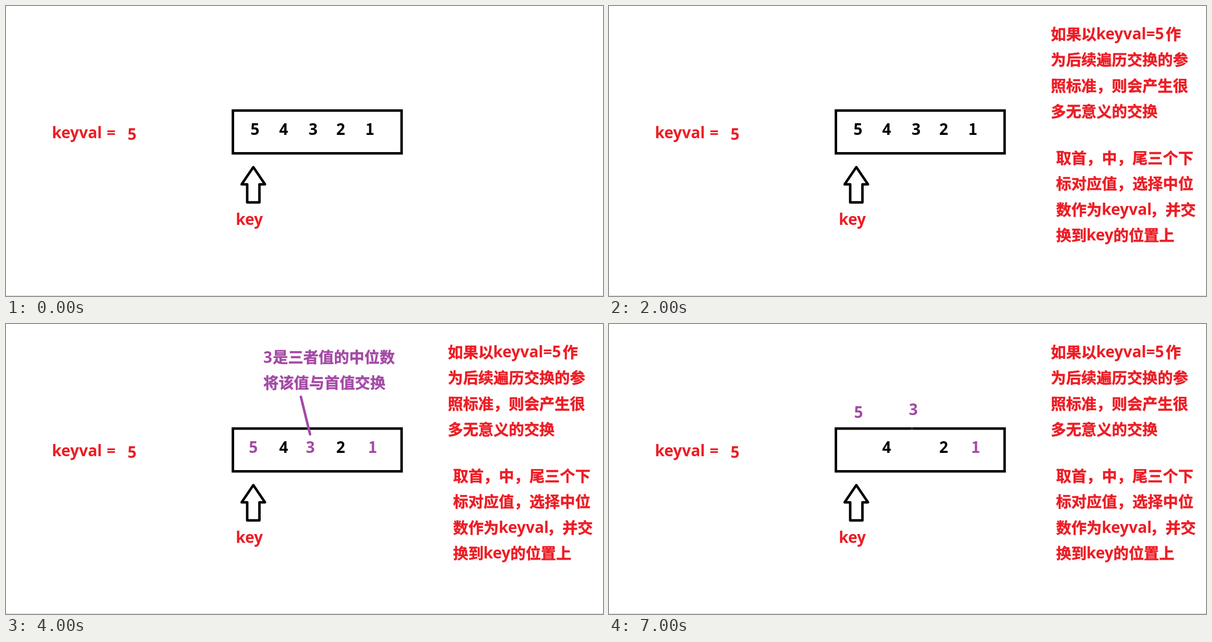
These frames come from a looping animation (1073 px wide and 522 px high, 8000 ms). An HTML page:

```html
<!DOCTYPE html>
<html lang="zh-CN">
<head>
<meta charset="utf-8">
<style>
html, body { margin: 0; width: 100%; height: 100%; overflow: hidden; background: #fff; }
svg { display: block; width: 100%; height: 100%; }
text { font: 700 28px "Open Sans", "Noto Sans", sans-serif; white-space: pre; }
.han { font: 700 27.45px "Noto Sans CJK SC", "Noto Sans CJK", sans-serif; stroke-width: 0.5px; }
.one { font: 700 28px "Noto Sans CJK SC", "Noto Sans CJK", sans-serif; }
</style>
</head>
<body>
<svg id="stage" viewBox="0 0 1073 522"></svg>
<script>
const NS = "http://www.w3.org/2000/svg";
const stage = document.getElementById("stage");
const RED = "#ed1c24", PURPLE = "#a349a4", BLACK = "#000";
const LOOP = 8000;
const timed = [];

function add(tag, attrs, from = 0, to = LOOP) {
  const el = document.createElementNS(NS, tag);
  for (const k in attrs) el.setAttribute(k, attrs[k]);
  stage.appendChild(el);
  timed.push({ el, from, to });
  return el;
}

function label(str, x, y, fill, from, to, extra = {}) {
  add("text", { x, y, fill, ...extra }, from, to).textContent = str;
}

const han = (str, x, y, fill, from, to) =>
  label(str, x, y, fill, from, to, { class: "han", stroke: fill });

function digit(n, x, y, fill, from, to) {
  const extra = { "text-anchor": "middle" };
  if (n === 1) extra.class = "one";
  label(String(n), x, y, fill, from, to, extra);
}

// Array box, pointer and bottom rule
const outline = { fill: "none", stroke: BLACK, "stroke-width": 4.5 };
add("rect", { x: 0, y: 521, width: 1073, height: 1, fill: "#d2d2d2" });
add("rect", { x: 407.8, y: 188.2, width: 303.2, height: 77, ...outline });
add("path", {
  d: "M444.5 290L465.5 321H455.5V353.5H433.5V321H423.5Z",
  ...outline, "stroke-linejoin": "round"
});
label("key", 413, 394, RED);
label("keyval", 82.5, 238, RED);
label("=", 181, 238, RED);
digit(5, 226.5, 241, RED);

// Array values
const ROW = 232;
digit(4, 499, ROW, BLACK);
digit(2, 601.5, ROW, BLACK);
digit(5, 447.5, ROW, BLACK, 0, 3000);
digit(3, 552, ROW, BLACK, 0, 3000);
digit(1, 654, ROW, BLACK, 0, 3000);
digit(5, 444.5, ROW, PURPLE, 3000, 7000);
digit(3, 547, ROW, PURPLE, 3000, 6000);
digit(1, 659, ROW, PURPLE, 3000);
digit(3, 547, 163.5, PURPLE, 6000);
digit(5, 448.5, 168.5, PURPLE, 7000);

// First note
han("如果以", 794, 60.5, RED, 1000);
label("keyval=5", 875.5, 60, RED, 1000);
han("作", 1000.5, 60.5, RED, 1000);
han("为后续遍历交换的参", 794, 107, RED, 1000);
han("照标准，则会产生很", 794, 153.5, RED, 1000);
han("多无意义的交换", 794, 200, RED, 1000);

// Second note
han("取首，中，尾三个下", 803.5, 284, RED, 2000);
han("标对应值，选择中位", 803.5, 330.3, RED, 2000);
han("数作为", 803.5, 376.6, RED, 2000);
label("keyval", 885.5, 376, RED, 2000);
han("，并交", 972.5, 376.6, RED, 2000);
han("换到", 803.5, 423, RED, 2000);
label("key", 858, 422, RED, 2000);
han("的位置上", 906.5, 423, RED, 2000);

// Median remark
digit(3, 470.5, 70, PURPLE, 4000, 6000);
han("是三者值的中位数", 479.5, 70, PURPLE, 4000, 6000);
han("将该值与首值交换", 462.5, 116.3, PURPLE, 4000, 6000);
add("path", {
  d: "M530 131L546.5 198.5", fill: "none", stroke: PURPLE,
  "stroke-width": 4.5, "stroke-linecap": "round"
}, 4000, 6000);
add("rect", { x: 542, y: 186, width: 5, height: 4, fill: "#3a1a3b" }, 6000);

function draw(t) {
  for (const { el, from, to } of timed)
    el.setAttribute("visibility", t >= from && t < to ? "visible" : "hidden");
}

const start = performance.now();
function tick() {
  draw((performance.now() - start) % LOOP);
  requestAnimationFrame(tick);
}
draw(0);
requestAnimationFrame(tick);
</script>
</body>
</html>
```
